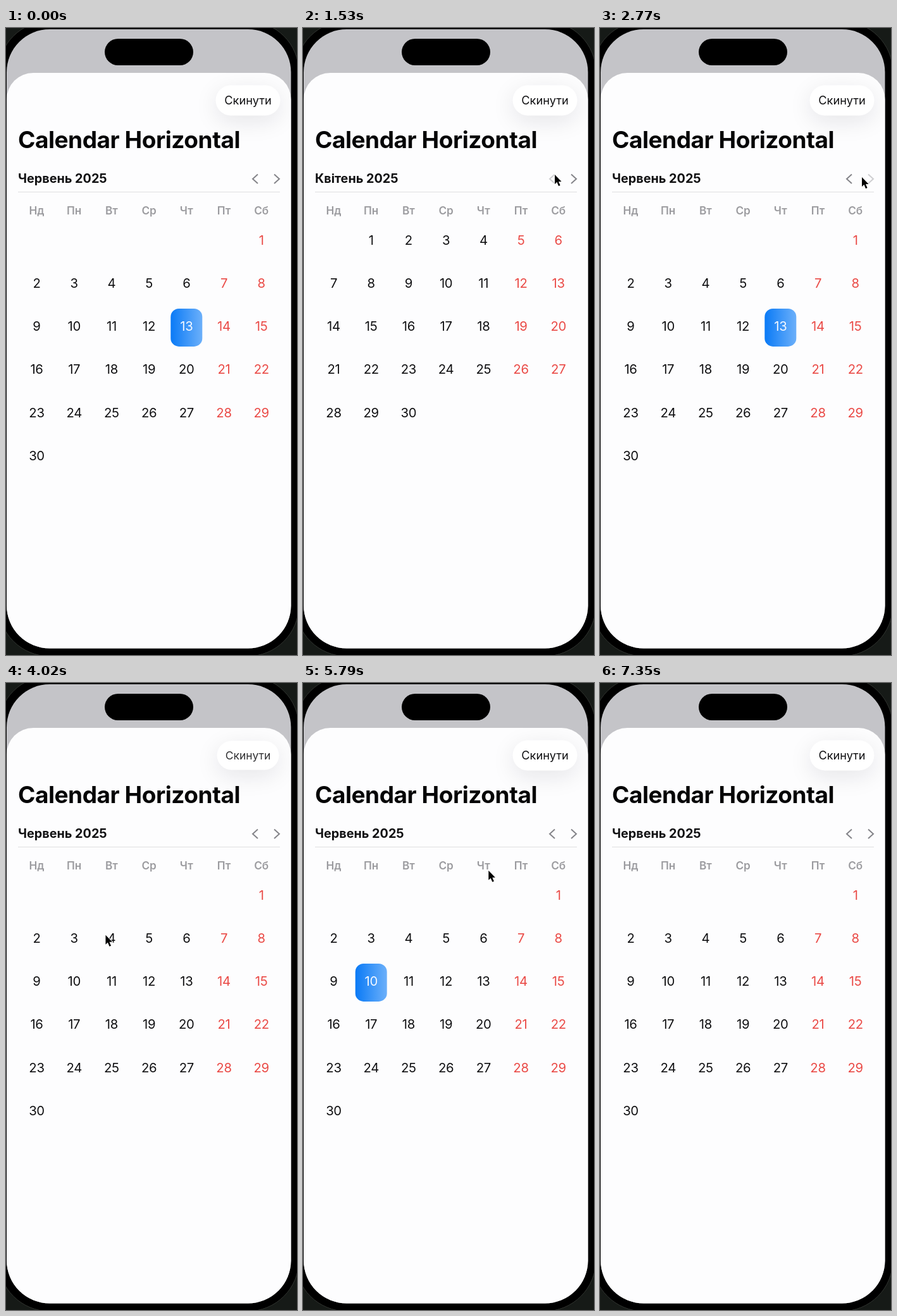
Animation, 460 px wide and 992 px high, one loop 8 s. Source, as an HTML page with a canvas:

```html
<!DOCTYPE html>
<html lang="uk">
<head>
<meta charset="utf-8">
<style>
  html, body { margin: 0; width: 100%; height: 100%; overflow: hidden; background: #000; }
  canvas { display: block; }
</style>
</head>
<body>
<canvas id="stage" width="460" height="992"></canvas>
<script>
const ctx = document.getElementById('stage').getContext('2d');
const LOOP = 8000, PRESS = 220, LINGER = 60;
const INK = '#101012', RED = '#ea4a46', MUTED = '#9b9b9f';
const WEEKDAYS = ['Нд', 'Пн', 'Вт', 'Ср', 'Чт', 'Пт', 'Сб'];
const MONTH_NAMES = { 4: 'Квітень', 5: 'Травень', 6: 'Червень' };

const columnX = i => 48.5 + 59.2 * i;
const rowY = i => 335.5 + 68.2 * i;

// Where the pointer goes; every visit ends with a release
const SPOTS = {
  edge: { x: 462, y: 300 },
  prev: { x: 398, y: 232 },
  next: { x: 414, y: 236 },
  reset: { x: 385, y: 99 },
  day: { x: columnX(1) - 2, y: rowY(2) - 5 },
  rest: { x: 169, y: 565 },
};
const VISITS = [
  ['edge', 110], ['prev', 1000], ['prev', 1500], ['next', 2230], ['next', 2740],
  ['reset', 3700], ['day', 4340], ['rest', 5120], ['reset', 6510], ['edge', 7250],
].map(([name, time]) => ({ name, time, ...SPOTS[name] }));

const clamp = v => Math.min(1, Math.max(0, v));
const ease = v => v * v * (3 - 2 * v);
const releases = (name, t) => VISITS.filter(v => v.name === name && v.time <= t);
const started = (name, t) => VISITS.filter(v => v.name === name && v.time - PRESS <= t).pop();

function stateAt(t) {
  const month = 6 - releases('prev', t).length + releases('next', t).length;
  const last = VISITS.filter(v => /day|reset/.test(v.name) && v.time <= t).pop();
  const picked = !last ? 13 : last.name === 'day' ? 10 : 0;
  return { month, picked: month === 6 ? picked : 0 };
}

function pressAlpha(name, t, recovery) {
  const visit = started(name, t);
  if (!visit) return 1;
  const since = t - visit.time;
  return since < 0 ? 1 - .7 * clamp((since + PRESS) / 60) : .3 + .7 * clamp(since / recovery);
}

// Grows while held, then springs back
function pressScale(name, t) {
  const visit = started(name, t);
  if (!visit) return 1;
  const since = t - visit.time, s = since / 1000;
  return 1 + .12 * (since < 0 ? ease(clamp((since + PRESS) / 180)) : Math.exp(-3.5 * s) * Math.cos(9.8 * s));
}

function box(x, y, w, h, r, fill) {
  ctx.beginPath();
  ctx.roundRect(x, y, w, h, r);
  ctx.fillStyle = fill;
  ctx.fill();
}

function text(str, x, y, size, weight, color, align = 'center', spacing = 0) {
  ctx.font = `${weight} ${size}px Inter, sans-serif`;
  ctx.letterSpacing = spacing + 'px';
  ctx.textAlign = align;
  ctx.fillStyle = color;
  ctx.fillText(str, x, y);
}

function line(points, color, width) {
  ctx.beginPath();
  points.forEach(p => ctx.lineTo(...p));
  ctx.strokeStyle = color;
  ctx.lineWidth = width;
  ctx.stroke();
}

function chevron(x, dir, alpha) {
  ctx.globalAlpha = alpha;
  line([[x - 4 * dir, 231.5], [x + 4 * dir, 238.7], [x - 4 * dir, 246]], '#85858a', 2);
  ctx.globalAlpha = 1;
}

function drawPhone() {
  ctx.fillStyle = '#161a17';
  ctx.fillRect(0, 0, 460, 992);
  box(-12, -11, 475, 1005, 81, '#000');
  ctx.strokeStyle = '#30332f';
  ctx.lineWidth = 1;
  ctx.stroke();
  box(1, 2, 449.5, 979.5, 68, '#c4c4c8');
  box(156, 17, 140, 42, 21, '#000');
}

function drawReset(t) {
  const scale = pressScale('reset', t);
  ctx.save();
  ctx.translate(382.5, 114.5);
  ctx.scale(scale, scale);
  ctx.shadowColor = 'rgba(20,20,40,.1)';
  ctx.shadowBlur = 36;
  ctx.shadowOffsetY = 9;
  box(-51, -24, 102, 48, 24, '#fff');
  ctx.shadowColor = 'transparent';
  ctx.globalAlpha = pressAlpha('reset', t, 400);
  text('Скинути', 0, 6.5, 18.2, 400, INK);
  ctx.restore();
}

function drawCalendar(t) {
  const { month, picked } = stateAt(t);
  text('Calendar Horizontal', 19, 190, 37, 700, '#050506', 'left', -.45);
  text(MONTH_NAMES[month] + ' 2025', 19, 245, 19.8, 700, INK, 'left');
  chevron(394, -1, pressAlpha('prev', t, 250));
  chevron(428, 1, pressAlpha('next', t, 250));
  line([[19, 259.5], [433, 259.5]], '#dedee0', 1.2);
  WEEKDAYS.forEach((day, i) => text(day, columnX(i), 295, 17.2, 600, MUTED));

  const offset = (new Date(2025, month - 1, 1).getDay() + 6) % 7;
  const days = new Date(2025, month, 0).getDate();
  for (let day = 1; day <= days; day++) {
    const cell = day + offset - 1, col = cell % 7;
    const x = columnX(col), y = rowY(Math.floor(cell / 7));
    if (day === picked) {
      const fill = ctx.createLinearGradient(x - 25, 0, x + 25, 0);
      fill.addColorStop(0, '#0a7af6');
      fill.addColorStop(1, '#6cb0fa');
      box(x - 25, y - 28, 50, 60, 13, fill);
    }
    text(day, x, y + 7.2, 20.3, 400, day === picked ? '#f4f8ff' : col > 4 ? RED : INK, 'center', -.3);
  }
}

function drawPointer(t) {
  const i = VISITS.findIndex(v => v.time + LINGER > t);
  if (i < 1) return;
  const from = VISITS[i - 1], to = VISITS[i];
  const leave = from.time + LINGER, arrive = to.time - PRESS;
  const k = ease(clamp((t - leave) / (arrive - leave)));
  ctx.save();
  ctx.translate(from.x + (to.x - from.x) * k, from.y + (to.y - from.y) * k);
  ctx.stroke(new Path2D());
  const arrow = new Path2D('M0 0V15L3.4 11.8L6 18L8.6 17L6 11H10.6Z');
  ctx.strokeStyle = '#fff';
  ctx.lineWidth = 1.6;
  ctx.stroke(arrow);
  ctx.fillStyle = '#000';
  ctx.fill(arrow);
  ctx.restore();
}

function draw() {
  const t = performance.now() % LOOP;
  drawPhone();
  ctx.save();
  ctx.beginPath();
  ctx.roundRect(1, 71, 449.5, 910.5, [42, 42, 68, 68]);
  ctx.clip();
  ctx.fillStyle = '#fdfdfe';
  ctx.fillRect(0, 71, 460, 921);
  drawReset(t);
  drawCalendar(t);
  ctx.restore();
  drawPointer(t);
  requestAnimationFrame(draw);
}
draw();
</script>
</body>
</html>
```
